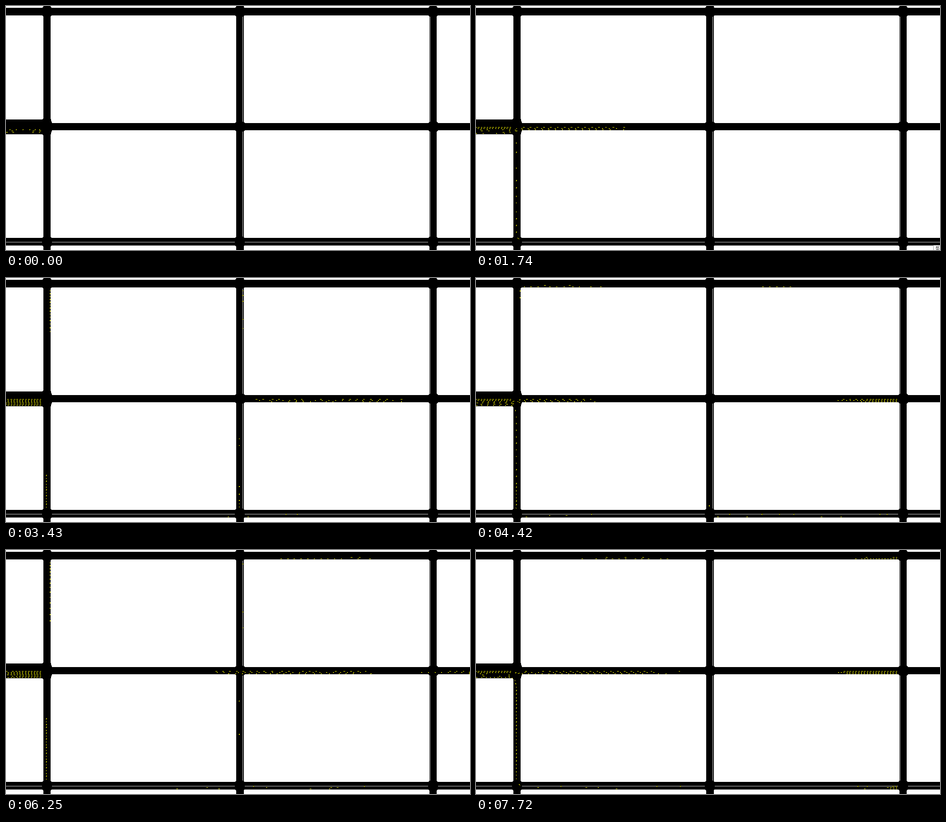
Write an HTML page that moves like this. It is 1030x544 px and loops after 8 s.

```html
<!DOCTYPE html>
<html lang="en">
<head>
<meta charset="utf-8">
<title>Traffic grid</title>
<style>
  html, body { margin: 0; width: 1030px; height: 544px; overflow: hidden; background: #fff; }
  svg { display: block; }
  text { font: 9px "Noto Sans CJK KR", "Noto Sans CJK", sans-serif; }
</style>
</head>
<body>
<svg width="1030" height="544" viewBox="0 0 1030 544" shape-rendering="crispEdges">
  <path id="roads"/>
  <path id="marks" fill="#d8d8d8"/>
  <path id="cars" fill="#ff0"/>
  <g id="tip" visibility="hidden">
    <rect x="1015.5" y="533.5" width="30" height="20" fill="#fff" stroke="#999"/>
    <text x="1020" y="543">정지</text>
  </g>
</svg>
<script>
(() => {
const $ = id => document.getElementById(id);
const LOOP = 8000, CYCLE = 77, FIRST_GREEN = 28;
const SPEED = 12.3, ACCEL = 2.2, PITCH = 6.4, HEADWAY = 1.7;

// Bursts of simulation steps: start ms, end ms, number of steps.
const bursts = [
  [60, 830, 25], [890, 1690, 24], [1720, 1780, 3],
  [1980, 2770, 25], [2800, 3580, 26], [3610, 3710, 3],
  [3960, 4750, 26], [4780, 5560, 25], [5590, 5650, 3],
  [5960, 6760, 23], [6790, 7590, 25], [7630, 7720, 4]
];

let seed = 20;
function random() {
  seed = (seed * 16807) % 2147483647;
  return seed / 2147483647;
}

// ---- Static road grid ----
const columns = [91, 519, 948], rows = [12.5, 269, 525.5];

function drawRoads() {
  const box = (x, y, w, h) => `M${x} ${y}h${w}v${h}h${-w}z`;
  let roads = box(0, 4, 1030, 17) + box(0, 261, 1030, 16) + box(0, 517, 1030, 17) +
    box(83, 0, 16, 544) + box(511, 0, 17, 544) + box(940, 0, 16, 544) + box(0, 253, 83, 33) +
    'M80 253L83 250H99L102 261V277L99 288H83L80 286z';
  for (const x of columns) for (const y of rows)
    roads += `M${x - 11} ${y - 8}l3 -3h16l3 3v16l-3 3h-16l-3 -3z`;
  $('roads').setAttribute('d', roads);

  let marks = '';
  for (const x of [525, 941]) marks += box(x, 24, 1, 234) + box(x, 280, 1, 234);
  for (const [a, b] of [[0, 80], [102, 508], [530, 937], [959, 1030]])
    marks += box(a, 526, b - a, 1);
  $('marks').setAttribute('d', marks);
}

// ---- Lanes ----
const edges = [];   // ordered downstream first

function edge(points, green, pick, gap = 0) {
  const parts = points.slice(1).map(([x, y], i) => {
    const [px, py] = points[i], length = Math.hypot(x - px, y - py);
    return { px, py, length, dx: (x - px) / length, dy: (y - py) / length };
  });
  const length = parts.reduce((sum, p) => sum + p.length, 0);
  const e = { parts, length, green, pick, gap, last: -99, cars: [] };
  edges.push(e);
  return e;
}

const always = () => true;
const between = (a, b) => phase => phase >= a && phase < b;
const to = (target, at = 0) => () => ({ edge: target, at });
const laneY = (center, lane) => center + 1.4 + 2.74 * lane;

const eastGreen = between(40, 72), middleGreen = between(39, 77);
const northGreen = between(0, 32), southGreen = between(0, 38);

// Two eastbound blocks behind one junction, for each lane of a row.
function eastRoad(center, entry) {
  return [0, 1, 2].map(lane => {
    const y = laneY(center, lane);
    const out = edge([[936, y], [1045, y]], always, null);
    const second = edge([[507, y], [936, y]], eastGreen, to(out));
    return { y, second, entry: entry && edge([entry, [103, y], [507, y]], middleGreen, to(second)) };
  });
}

const topRoad = eastRoad(rows[0], [98, 25]);
const bottomRoad = eastRoad(rows[2], [89.8, 514]);
const middleRoad = eastRoad(rows[1]);

const topLane = () => topRoad[random() < 0.8 ? 2 : 1];
const bottomLane = () => bottomRoad[Math.floor(random() * 3)];

const north2 = edge([[507, 270.4], [522, 264], [526, 250], [526, 25]], northGreen,
  () => ({ edge: topLane().second, at: 24 }));
const south2 = edge([[507, 275.9], [514, 280], [518, 295], [518, 514]], southGreen,
  () => ({ edge: bottomLane().second, at: 24 }), 3);
const north1 = edge([[79, 270.4], [86, 268], [93, 252], [98, 238], [98, 25]], northGreen,
  () => ({ edge: topLane().entry, at: 0 }));
const south1 = edge([[79, 284], [87, 293], [89.8, 305], [89.8, 514]], southGreen,
  () => ({ edge: bottomLane().entry, at: 0 }), 4);

const side = [north2, null, south2];
const block = middleRoad.map(({ y, second }, lane) =>
  edge([[79, laneY(269, lane + 2)], [103, y], [507, y]], middleGreen,
    () => ({ edge: side[lane] && random() < 0.22 ? side[lane] : second, at: 0 })));

const exits = [north1, north1, ...block, south1];
const entries = exits.map((exit, lane) => {
  const y = laneY(269, lane);
  const green = lane === 0 ? between(34, 54) : lane === 1 ? () => false : between(0, 30);
  return edge([[-6, y], [79, y]], green, to(exit));
});

// ---- Simulation ----
function enter(e, car, pos) {
  car.pos = pos;
  car.next = e.pick && e.pick();
  e.cars.push(car);
  e.cars.sort((a, b) => b.pos - a.pos);
}

function limitFor(e, i, phase, step) {
  if (i > 0) return e.cars[i - 1].pos - PITCH;
  if (!e.green(phase) || step - e.last < e.gap) return e.length;
  const { next } = e.cars[0];
  if (!next) return Infinity;
  const ahead = next.edge.cars.filter(c => c.pos >= next.at).pop();
  return ahead ? e.length - next.at + ahead.pos - PITCH : Infinity;
}

function advance(step) {
  const phase = step < FIRST_GREEN ? CYCLE - 1 : (step - FIRST_GREEN) % CYCLE;
  for (const e of edges) {
    e.cars.forEach((car, i) => {
      const room = Math.max(0, limitFor(e, i, phase, step) - car.pos);
      car.v = Math.min(car.v + ACCEL, car.max, room / HEADWAY) * (1 - 0.06 * random());
      car.pos += car.v;
    });
    const head = e.cars[0];
    if (head && head.pos > e.length) {
      e.cars.shift();
      e.last = step;
      if (head.next) enter(head.next.edge, head, head.next.at + head.pos - e.length);
    }
  }
  entries.forEach((e, lane) => {
    const tail = e.cars[e.cars.length - 1];
    const open = step >= 0 || (lane > 1 && lane < 5);
    if (open && random() < 0.42 && (!tail || tail.pos > PITCH))
      enter(e, { v: SPEED * 0.8, max: SPEED * (0.92 + 0.2 * random()) }, 0);
  });
}

function triangle(e, pos) {
  let part;
  for (part of e.parts) {
    if (pos <= part.length) break;
    pos -= part.length;
  }
  const { px, py, dx, dy } = part;
  const x = px + dx * pos, y = py + dy * pos;
  const bx = x - 4.3 * dx, by = y - 4.3 * dy;
  const point = (u, v) => u.toFixed(1) + ' ' + v.toFixed(1);
  return `M${point(x, y)}L${point(bx - 0.8 * dy, by + 0.8 * dx)}L${point(bx + 0.8 * dy, by - 0.8 * dx)}z`;
}

const total = bursts.reduce((sum, b) => sum + b[2], 0);
const snapshots = [];
for (let step = -10; step <= total; step++) {
  advance(step);
  if (step >= 0)
    snapshots.push(edges.map(e => e.cars.map(c => triangle(e, c.pos)).join('')).join(''));
}

// ---- Playback ----
function stepAt(t) {
  let step = 0;
  for (const [start, end, count] of bursts) {
    if (t < start) break;
    step += Math.min(count, 1 + Math.floor((t - start) / (end - start) * (count - 1)));
  }
  return step;
}

let shown = -1;
function render(now) {
  const t = now % LOOP, step = stepAt(t);
  if (step !== shown) $('cars').setAttribute('d', snapshots[shown = step]);
  $('tip').setAttribute('visibility', t >= 890 && t < 2770 ? 'visible' : 'hidden');
}

function frame() {
  render(performance.now());
  requestAnimationFrame(frame);
}

drawRoads();
frame();
})();
</script>
</body>
</html>
```
